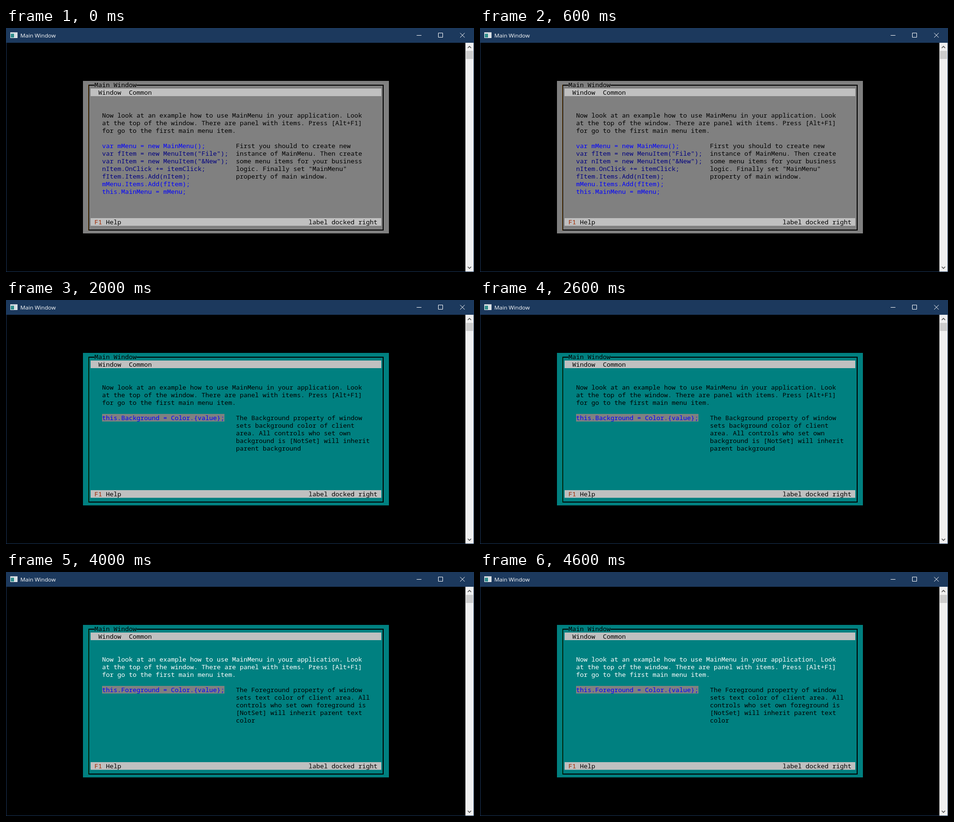
Recreate the animation shown at these times as an HTML page. Size 979 by 512 pixels, loop 5000 ms.

```html
<!DOCTYPE html>
<html lang="en">
<head>
<meta charset="utf-8">
<title>Main Window</title>
<style>
  html, body { margin: 0; width: 100%; height: 100%; overflow: hidden; background: #000; }
  svg { display: block; }
  rect { shape-rendering: crispEdges; }
  text { white-space: pre; }
  #console { font: 13.333px "Noto Sans Mono", "DejaVu Sans Mono", monospace; }
  .title { font: 11.65px "Open Sans", "Noto Sans", sans-serif; fill: #fff; }
</style>
</head>
<body>
<svg width="979" height="512" viewBox="0 0 979 512">
  <rect width="979" height="512" fill="#1c395d"/>
  <rect x="1" y="31" width="960" height="480"/>

  <rect x="9" y="9" width="15" height="12" fill="#f4f6f7"/>
  <rect x="10" y="10" width="13" height="1" fill="#a9b4bd"/>
  <rect x="10" y="12" width="7" height="8" fill="#2f8d8c"/>
  <rect x="18" y="12" width="5" height="8" fill="#d5dde2"/>
  <text class="title" x="30" y="20">Main Window</text>
  <g fill="none" stroke="#fff">
    <path d="M859 15.5h10M904.5 10.5h9v9h-9z"/>
    <path d="M950 10.5l9.5 9.5m0-9.5l-9.5 9.5"/>
  </g>

  <rect x="961" y="31" width="17" height="480" fill="#f0f0f0"/>
  <rect x="962" y="48" width="15" height="17" fill="#cdcdcd"/>
  <path d="M966 42l3.5-3.5 3.5 3.5M966 501l3.5 3.5 3.5-3.5" fill="none" stroke="#505050" stroke-width="1.6"/>

  <g id="console"></g>
</svg>
<script>
const GRAY = '#808080', TEAL = '#008080', SILVER = '#c0c0c0', CYAN = '#00ffff';
const BLUE = '#0000ff', NAVY = '#000080';
const FRINGE = { [GRAY]: '#6b4000', [TEAL]: '#004a18', [SILVER]: '#9c5c10' };

const INTRO = [
  'Now look at an example how to use MainMenu in your application. Look',
  'at the top of the window. There are panel with items. Press [Alt+F1]',
  'for go to the first main menu item.'
];
const SETUP = [
  'var mMenu = new MainMenu();',
  'var fItem = new MenuItem("File");',
  'var nItem = new MenuItem("&New");',
  'nItem.OnClick += itemClick;',
  'fItem.Items.Add(nItem);',
  'mMenu.Items.Add(fItem);',
  'this.MainMenu = mMenu;'
];
const SETUP_NOTE = [
  'First you should to create new',
  'instance of MainMenu. Then create',
  'some menu items for your business',
  'logic. Finally set "MainMenu"',
  'property of main window.'
];
const BACK_NOTE = [
  'The Background property of window',
  'sets background color of client',
  'area. All controls who set own',
  'background is [NotSet] will inherit',
  'parent background'
];
const FORE_NOTE = [
  'The Foreground property of window',
  'sets text color of client area. All',
  'controls who set own foreground is',
  '[NotSet] will inherit parent text',
  'color'
];
const KINDS = ['Background', 'Foreground'];
const BACK_COLORS = ['DarkBlue', 'DarkCyan', 'DarkGray', 'DarkGreen', 'DarkMagenta', 'DarkRed', 'DarkYellow'];
const FORE_COLORS = ['Black', 'Blue', 'Cyan', 'Gray', 'Green', 'Magenta', 'Red', 'White', 'Yellow'];

// Console cells are 8 by 16 pixels.
const px = col => 1 + col * 8;
const py = row => 31 + row * 16;
const escape = s => s.replace(/&/g, '&amp;').replace(/</g, '&lt;');
const rect = (x, y, w, h, fill = '#000') =>
  `<rect x="${x}" y="${y}" width="${w}" height="${h}" fill="${fill}"/>`;
const cells = (col, row, w, h, fill) => rect(px(col), py(row), w * 8, h * 16, fill);
const text = (col, row, s, fill = '#000') =>
  `<text x="${px(col)}" y="${py(row) + 13}" fill="${fill}">${escape(s)}</text>`;
const lines = (col, row, list, fill) => list.map((s, i) => text(col, row + i, s, fill)).join('');

function panel(col, row, w, h, fill) {
  const x = px(col + 1) + 3, y = py(row) + 8;
  const width = (w - 3) * 8 + 2, height = (h - 1) * 16;
  return cells(col, row, w, h, fill) +
    rect(x, y, width, 2) + rect(x, y + height, width, 2) +
    rect(x, y, 1, height + 2, FRINGE[fill]) + rect(x + 1, y, 1, height + 2) +
    rect(x + width - 2, y, 2, height + 2);
}

function popup(col, row, w, items, chosen) {
  return panel(col, row, w, items.length + 2, SILVER) +
    cells(col + 2, row + 1 + chosen, w - 4, 1, CYAN) +
    lines(col + 4, row + 1, items);
}

function menus(kind, row, w, items, chosen) {
  const arrows = KINDS.map((_, i) => `<path d="M385 ${py(8 + i) + 4}l8 4-8 4z"/>`).join('');
  return cells(31, 6, 8, 1, CYAN) + text(32, 6, 'Common') +
    popup(30, 7, 21, KINDS, kind) + arrows +
    popup(51, row, w, items, chosen);
}

function desktop(fill, introColor) {
  return panel(20, 5, 80, 20, fill) +
    cells(23, 5, 11, 1, fill) + text(23, 5, 'Main Window') +
    cells(22, 6, 76, 1, SILVER) + text(24, 6, 'Window') + text(32, 6, 'Common') +
    lines(25, 9, INTRO, introColor) +
    cells(22, 23, 76, 1, SILVER) + text(23, 23, 'F1', '#a02800') +
    text(26, 23, 'Help') + text(79, 23, 'label docked right');
}

const setup = desktop(GRAY) +
  SETUP.map((s, i) => text(25, 13 + i, s, i > 0 && i < 5 ? NAVY : BLUE)).join('') +
  lines(60, 13, SETUP_NOTE);
const property = (name, note, introColor) => desktop(TEAL, introColor) +
  cells(25, 13, 32, 1, GRAY) + text(25, 13, `this.${name} = Color.{value};`, BLUE) +
  lines(60, 13, note);
const background = property('Background', BACK_NOTE);

const scenes = [
  setup,
  setup + menus(0, 7, 22, BACK_COLORS, 1),
  background,
  background + menus(1, 8, 18, FORE_COLORS, 7),
  property('Foreground', FORE_NOTE, '#fff')
];

const view = document.getElementById('console');
let shown = -1;
function draw() {
  const scene = Math.floor(performance.now() / 1000) % scenes.length;
  if (scene !== shown) view.innerHTML = scenes[shown = scene];
  requestAnimationFrame(draw);
}
draw();
</script>
</body>
</html>
```
